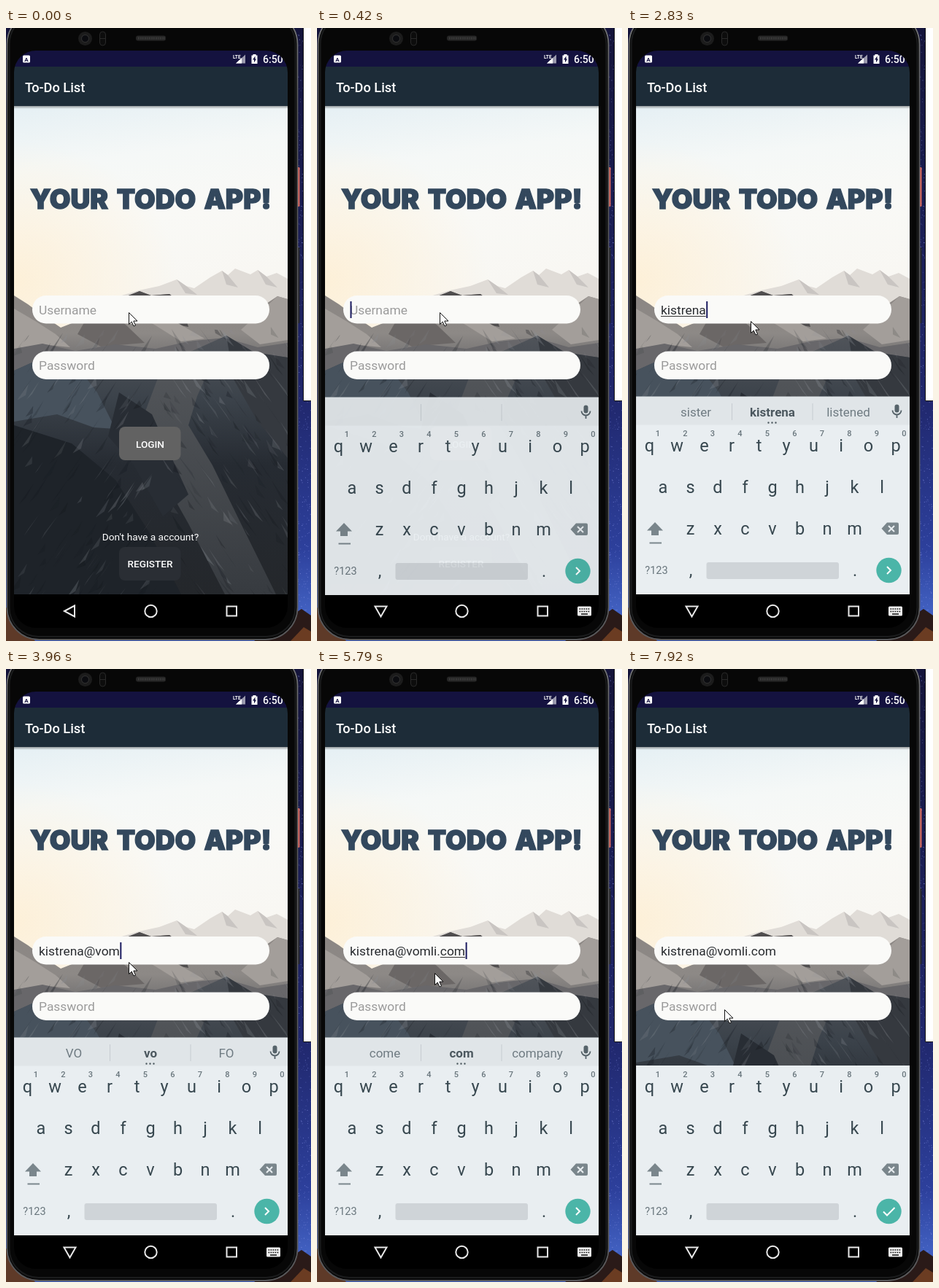
These frames come from a looping animation (418x841 px, 8000 ms). An HTML page:

```html
<!DOCTYPE html>
<html lang="en">
<head>
<meta charset="utf-8">
<title>To-Do List login</title>
<style>
  html, body { margin: 0; width: 100%; height: 100%; overflow: hidden; background: #000; }
  svg { display: block; width: 418px; height: 841px; }
  text { font-family: Roboto, "Open Sans", sans-serif; white-space: pre; }
  .mid { text-anchor: middle; }
  .field { font-size: 17.4px; }
  .hint { fill: #9b9b9b; }
  .button { font-size: 13.6px; font-weight: 500; fill: #fff; }
  .title { font: 900 37px Inter, Roboto, sans-serif; fill: #33485d; stroke: #33485d; stroke-width: 1.4; }
  .key { font-size: 23.5px; fill: #37474f; }
  .digit { font-size: 11px; font-weight: 500; fill: #68757c; }
  .suggestion { font-size: 17px; fill: #6f7b82; }
  .best { font-weight: 700; fill: #4c585f; }
</style>
</head>
<body>
<svg viewBox="0 0 418 841">
  <defs>
    <linearGradient id="night" x2="0" y2="1">
      <stop offset="0" stop-color="#14143a"/><stop offset=".6" stop-color="#20276c"/>
      <stop offset=".85" stop-color="#2d409c"/><stop offset=".95" stop-color="#4160c0"/>
    </linearGradient>
    <linearGradient id="metal" x2="0" y2="1">
      <stop offset="0" stop-color="#77787a"/><stop offset=".15" stop-color="#555658"/><stop offset="1" stop-color="#59595b"/>
    </linearGradient>
    <linearGradient id="sky" x1=".1" x2=".25" y2="1">
      <stop offset="0" stop-color="#e6f0f4"/><stop offset=".25" stop-color="#f5f8f7"/>
      <stop offset=".5" stop-color="#f9f9f6"/><stop offset="1" stop-color="#f8f6f1"/>
    </linearGradient>
    <radialGradient id="glow" cx="0" cy=".75" r=".6">
      <stop offset="0" stop-color="#fdf0d8"/><stop offset="1" stop-color="#fdf0d8" stop-opacity="0"/>
    </radialGradient>
    <linearGradient id="middle" x2="0" y2="1">
      <stop offset="0" stop-color="#8b8683"/><stop offset=".45" stop-color="#8d8986"/><stop offset="1" stop-color="#57585c"/>
    </linearGradient>
    <linearGradient id="front" x2="0" y2="1">
      <stop offset="0" stop-color="#50545a"/><stop offset=".25" stop-color="#3b424a"/>
      <stop offset=".5" stop-color="#262b32"/><stop offset="1" stop-color="#24272b"/>
    </linearGradient>
    <linearGradient id="slab" x2="0" y2="1">
      <stop offset="0" stop-color="#55585c"/><stop offset="1" stop-color="#373b40"/>
    </linearGradient>
    <linearGradient id="barShadow" x2="0" y2="1">
      <stop offset="0" stop-opacity=".35"/><stop offset="1" stop-opacity="0"/>
    </linearGradient>
    <clipPath id="screen"><rect x="11" y="31" width="375" height="792" rx="30"/></clipPath>
    <clipPath id="rock"><path d="M11 425 70 415 130 400 300 415 386 405V777H11Z"/></clipPath>
  </defs>

  <rect width="418" height="841" fill="url(#night)"/>
  <g id="stars" fill="#8f9aec"/>
  <path d="M0 795Q15 802 40 841H0Z" fill="#5e3a28"/>
  <path d="M340 841 396 803 405 797 418 806V841Z" fill="#2a1a18"/>
  <path d="M390 841 408 822 418 828V841Z" fill="#6b3c22"/>
  <path d="M407.500-2H420V511.500H407.500Z" fill="#fff" stroke="#111"/>

  <rect x="398" y="191" width="4.500" height="54" rx="1" fill="#d9695f"/>
  <rect x="398" y="301" width="4.500" height="104" rx="1" fill="#25262c"/>
  <rect x="1.500" y="-22" width="398" height="861" rx="44" fill="#070707" stroke="url(#metal)" stroke-width="1.800"/>
  <rect x="4.500" y="-18" width="392" height="853" rx="40" fill="none" stroke="#1b1c1d" stroke-width="2"/>
  <circle cx="108.500" cy="14.500" r="9.500" fill="#1c1c1c"/><circle cx="108.500" cy="14.500" r="5" fill="#0b0c10" stroke="#343434"/>
  <rect x="128.500" y="5" width="8" height="19" rx="4" fill="#0d0d0d" stroke="#292929"/>
  <path d="M128 14.500H137" stroke="#292929"/>
  <rect x="178" y="10.500" width="41" height="7" rx="3" fill="#262626"/>
  <path d="M181 14H217" stroke="#444" stroke-width="3" stroke-dasharray="1 1.500"/>

  <g clip-path="url(#screen)">
    <rect x="11" y="107" width="375" height="670" fill="#282c31"/>
    <rect x="11" y="107" width="375" height="320" fill="url(#sky)"/>
    <rect x="11" y="107" width="375" height="320" fill="url(#glow)"/>
    <path d="M155 368 182 360 210 354 234 345 247 354 258 357 280 342 296 333 304 339 314 330 335 338 345 332 357 341 371 336 386 344V430H155Z" fill="#e0dcd7"/>
    <path d="M234 345 247 354 262 366 246 364ZM296 333 304 339 318 356 302 352ZM345 332 357 341 372 356 356 352Z" fill="#c9c5c2"/>
    <path d="M11 367 30 379 50 394 75 411 98 402 118 385 132 379 160 370 183 361 199 367 224 365 240 377 275 386 315 392 345 386 372 368 386 372V490H11Z" fill="url(#middle)"/>
    <path d="M160 370 183 361 199 367 224 365 240 377 250 410 195 400Z" fill="#4f4d4e"/>
    <path d="M118 385 132 379 165 408 190 432 130 437 98 420Z" fill="#6b6766"/>
    <path d="M11 385 40 402 68 420 88 438 50 434 11 445ZM372 368 386 372V428L348 434 322 414ZM200 405 236 405 272 426 240 430Z" fill="#a39e9a"/>
    <path d="M11 440 50 433 95 443 150 434 205 440 250 430 300 425 345 438 386 432V500H11Z" fill="#68676a"/>
    <path d="M11 470 60 448 130 470 215 462 262 440 302 422 340 445 386 452V777H11Z" fill="url(#front)"/>
    <path d="M11 470 60 448 95 461 125 500 150 550 120 548 70 530 11 540Z" fill="#47525d"/>
    <path d="M215 462 262 440 282 461 262 505 250 545 283 600 322 680 370 777H300L250 680 205 600 180 555Z" fill="url(#slab)"/>
    <path d="M302 422 340 445 386 452V590L345 540 312 482Z" fill="#35393f"/>
    <path d="M11 545 90 570 150 620 195 690 240 777H11Z" fill="#1e2329"/>
    <path d="M155 500 200 530 250 640 215 670 175 600 140 560Z" fill="#282d34"/>
    <g id="facets" clip-path="url(#rock)"/>

    <rect x="11" y="31" width="375" height="23" fill="#14123f"/>
    <rect x="11" y="53" width="375" height="54" fill="#1d2c38"/>
    <rect x="11" y="107" width="375" height="4" fill="url(#barShadow)"/>
    <rect x="23" y="37.500" width="10" height="10" rx="1.500" fill="#fff"/>
    <text class="mid" x="28" y="45.500" font-size="8" font-weight="700" fill="#14123f">A</text>
    <text x="311" y="41.500" font-size="6.500" font-weight="700" fill="#fff">LTE</text>
    <path d="M315 48.500H328V36.500Z" fill="#9b9aae"/><path d="M315 48.500H323V41Z" fill="#fff"/>
    <path d="M336.500 37.500H338.500V36H342.500V37.500H344.500V49H336.500Z" fill="#fff"/>
    <path d="M341.500 38.500 338 43.500H340V47.500L343 42.500H341.500Z" fill="#14123f"/>
    <text x="352" y="48" font-size="14" font-weight="500" fill="#fff">6:50</text>
    <text x="26" y="87.500" font-size="18.200" font-weight="500" fill="#fff">To-Do List</text>

    <text class="title mid" x="86.500" y="248">YOUR</text>
    <text class="title mid" x="206" y="248">TODO</text>
    <text class="title mid" x="317.500" y="248">APP!</text>

    <rect x="36" y="367" width="325" height="38.500" rx="19" fill="#fafaf8"/>
    <rect x="36" y="443.500" width="325" height="38.500" rx="19" fill="#fafaf8"/>
    <text id="user" class="field" x="45" y="393"></text>
    <text class="field hint" x="45" y="469">Password</text>
    <rect id="underline" y="395" height="1" fill="#333"/>
    <rect id="caret" width="2" height="23" fill="#1b1b60"/>

    <rect x="155" y="547" width="84.500" height="46" rx="8" fill="#626262"/>
    <text class="button mid" x="197.500" y="576">LOGIN</text>
    <text class="mid" x="198" y="703" font-size="13.700" fill="#fff">Don't have a account?</text>
    <rect x="155" y="712" width="84.500" height="46" rx="8" fill="#2a2e34"/>
    <text class="button mid" x="197.500" y="740">REGISTER</text>

    <rect x="11" y="777" width="375" height="46" fill="#000"/>
    <g id="keyboard">
      <rect x="11" y="544" width="375" height="233" fill="#e9eef1"/>
      <g id="strip">
        <rect x="11" y="505.500" width="375" height="39" fill="#e0e5e8"/>
        <path d="M142.500 515V538M253 515V538" stroke="#c6ccd0"/>
        <rect x="365.500" y="516.500" width="6" height="11" rx="3" fill="#56636a"/>
        <path d="M362.500 524.500a6 6 0 0 0 12 0M368.500 530.500V535" fill="none" stroke="#56636a" stroke-width="1.800"/>
        <g id="suggestions">
          <text class="suggestion mid" x="93" y="532.500"></text>
          <text class="suggestion best mid" x="198" y="532.500"></text>
          <text class="suggestion mid" x="302" y="532.500"></text>
          <path d="M192.500 541.500H204" stroke="#4c585f" stroke-width="2.400" stroke-linecap="round" stroke-dasharray="0 5"/>
        </g>
      </g>
      <g id="keys"></g>
      <path d="M37 678 48 689.500H42V696H32V689.500H26Z" fill="#7a868c"/>
      <path d="M29.500 706.500H46" stroke="#7a868c" stroke-width="2"/>
      <path d="M355 678.500H369q2 0 2 2V693q0 2-2 2H355L347.500 686.800Z" fill="#7a868c"/>
      <path d="M357 683 365 691M365 683 357 691" stroke="#e9eef1" stroke-width="2"/>
      <text class="mid" x="39" y="749" font-size="14.500" fill="#68757c">?123</text>
      <rect x="107.500" y="733" width="181.500" height="23" rx="3" fill="#cfd4d8"/>
      <circle cx="357.500" cy="744" r="17.200" fill="#4bb5a8"/>
      <path id="enter" fill="none" stroke="#fff" stroke-width="2"/>
    </g>
    <g fill="none" stroke="#e8e8e8" stroke-width="2">
      <path id="back"/>
      <circle cx="198.500" cy="800" r="8.200"/>
      <rect x="302.500" y="793.500" width="13.500" height="13"/>
    </g>
    <g id="hideKeys">
      <rect x="357" y="793.500" width="19" height="13" rx="1.500" fill="#eee"/>
      <path d="M359.500 797H374M359.500 800.500H374" stroke="#111" stroke-width="1.700" stroke-dasharray="1.700 1.300"/>
      <path d="M362 804H371" stroke="#111" stroke-width="1.500"/>
    </g>
  </g>
  <path id="mouse" d="M.5.500V16.500L4.200 13 7 19 9.500 18 6.800 12H12Z" fill="#fff" stroke="#111"/>
</svg>

<script>
const LOOP = 8000;
const $ = id => document.getElementById(id);
const HINT = "Username", ADDRESS = "kistrena@vomli.com";

// Each track lists [time, value] pairs; a value holds until the next one.
const typed = [[0, 0], [1750, 1], [1900, 2], [2050, 3], [2170, 4], [2290, 5], [2410, 6], [2530, 7], [2680, 8],
  [3110, 9], [3660, 10], [3810, 11], [3960, 12], [4090, 13], [4210, 14], [4610, 15], [4760, 16], [5030, 17], [5270, 18]];
const caretOn = [[0, 0], [150, 1], [720, 0], [1080, 1], [1630, 0], [1750, 1], [3540, 0], [3660, 1],
  [5950, 0], [6370, 1], [6930, 0], [7330, 1], [7920, 0]];
const mouseAt = [[0, [168, 390]], [840, [168, 394]], [960, [168, 400]], [1080, [168, 402]],
  [5790, [161, 417]], [5950, [149, 437]], [6100, [133, 467]], [6250, [132, 467]]];
const keyboardAt = [[0, [0, 0]], [300, [50, .62]], [420, [1, .95]], [570, [0, 1]]];
const underlined = [[0, ""], [2830, "kistrena"], [3110, ""], [4360, "vomli"], [4760, ""], [5390, "com"], [7330, ""]];
const hints = [[0, ""], [1900, "l k km"], [2050, "ku ki kit"], [2170, "kid kis kiss"], [2290, "list kist mist"],
  [2410, "list kistr mist"], [2530, "sister kistre mister"], [2680, "sister kistren listen"], [2830, "sister kistrena listened"],
  [3110, ""], [3810, "c v be"], [3960, "VO vo FO"], [4090, "Tom vom from"], [4210, "Tom voml from"],
  [4360, "family vomli vanilla"], [4760, ""], [4880, "x c can"], [5150, "go co come"], [5390, "come com company"], [7330, ""]];

const at = (track, t) => track.reduce((value, [start, next]) => t >= start ? next : value, track[0][1]);

function seeded(seed) {
  return () => (seed = (seed * 16807) % 2147483647) / 2147483647;
}

function add(parent, name, attributes, content = "") {
  const node = document.createElementNS("http://www.w3.org/2000/svg", name);
  for (const key in attributes) node.setAttribute(key, attributes[key]);
  node.textContent = content;
  parent.append(node);
}

function buildScene() {
  const random = seeded(41);
  for (let i = 0; i < 420; i++) {
    add($("stars"), "rect", { x: 400 + random() * 18, y: random() * 800, width: 1, height: 1, opacity: .15 + random() * .6 });
  }
  // Thin shards that lean along the slopes on either side of the main peak.
  for (let i = 0; i < 320; i++) {
    const x = 11 + random() * 375, y = 405 + random() * 372;
    const side = x < 210 ? -1 : 1, drop = 10 + random() * 28;
    add($("facets"), "path", {
      d: `M${x} ${y}l${side * drop * .7} ${drop}l${-side * (4 + random() * 9)} ${-drop * .3}Z`,
      fill: random() < .6 ? "#12161b" : "#888d93", opacity: .1 + random() * .22
    });
  }
  const row = (letters, x, y, cls = "key mid") => [...letters].forEach((letter, i) =>
    add($("keys"), "text", { class: cls, x: x + 37.5 * i, y }, letter));
  row("qwertyuiop", 29.5, 581);
  row("1234567890", 41, 560, "digit mid");
  row("asdfghjkl", 48, 638);
  row("zxcvbnm", 85.5, 695);
  row(",", 86, 752);
  row(".", 311, 752);
}

const show = (node, visible) => node.setAttribute("visibility", visible ? "inherit" : "hidden");
const move = (node, x, y) => node.setAttribute("transform", `translate(${x} ${y})`);

function render(t) {
  const count = at(typed, t), text = ADDRESS.slice(0, count);
  const user = $("user");
  user.textContent = text || HINT;
  user.setAttribute("class", text ? "field" : "field hint");
  user.style.fill = text ? "#282b2f" : "";

  const inPassword = t >= 7330;
  const widthTo = n => n ? user.getSubStringLength(0, n) : 0;
  const caret = $("caret");
  caret.setAttribute("x", 45.5 + (inPassword ? 0 : widthTo(count)));
  caret.setAttribute("y", inPassword ? 451 : 375);
  show(caret, at(caretOn, t));

  const word = at(underlined, t), start = ADDRESS.indexOf(word);
  show($("underline"), word);
  $("underline").setAttribute("x", 45 + widthTo(start));
  $("underline").setAttribute("width", word ? widthTo(start + word.length) - widthTo(start) : 0);

  const [drop, opacity] = at(keyboardAt, t), open = opacity > 0;
  move($("keyboard"), 0, drop);
  $("keyboard").setAttribute("opacity", opacity);
  show($("hideKeys"), open);
  $("back").setAttribute("d", open ? "M79.500 793.500H95.500L87.500 807.500Z" : "M80 800 94 792.500V807.500Z");
  $("enter").setAttribute("d", inPassword ? "M350 744.500 355 749.500 365.500 739" : "M355 739 360 744 355 749");

  show($("strip"), t < 7450);
  const words = at(hints, t).split(" ");
  show($("suggestions"), words[0]);
  $("suggestions").querySelectorAll("text").forEach((node, i) => node.textContent = words[i] || "");

  move($("mouse"), ...at(mouseAt, t));
}

buildScene();
const begin = performance.now();
function tick() {
  render((performance.now() - begin) % LOOP);
  requestAnimationFrame(tick);
}
tick();
</script>
</body>
</html>
```
